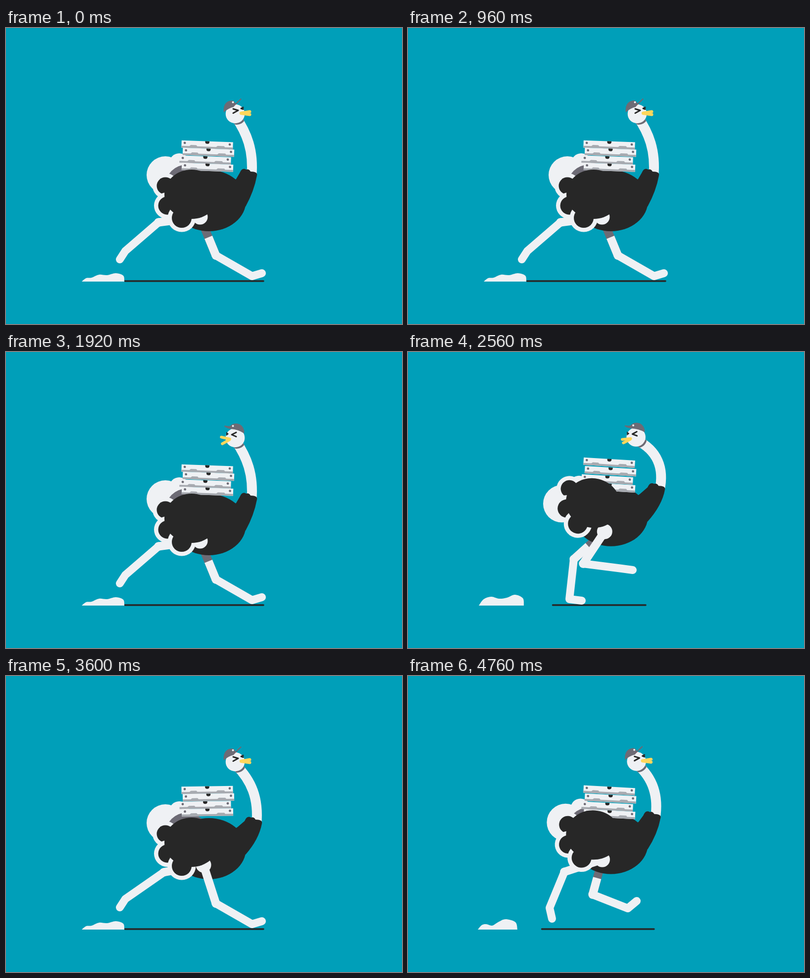
Recreate the animation shown at these times as an HTML page with a canvas. Size 800 by 600 pixels, loop 4800 ms.

```html
<!DOCTYPE html>
<html lang="en">
<head>
<meta charset="utf-8">
<title>Running ostrich</title>
<style>
html, body { margin: 0; width: 100%; height: 100%; overflow: hidden; background: #009fb9; }
canvas { display: block; width: 800px; height: 600px; }
</style>
</head>
<body>
<canvas id="stage" width="800" height="600"></canvas>
<script>
const ctx = document.getElementById('stage').getContext('2d');
const SKY = '#009fb9', WHITE = '#eff1f4', BLACK = '#272727', GRAY = '#6d6b75';
const SIDE = '#a7aab0', YELLOW = '#ffd75c';
const LOOP = 4800, TICK = 40, STRIDE = 480, STEP = 240;
const LOOK_BACK = 1000, LOOK_AHEAD = 2920;

// Knee, ankle and toe through one stride
const GAIT = [
  [308, 394, 241, 452, 230, 469],
  [308, 402, 255, 465, 243, 483],
  [318, 408, 302, 484, 300, 502],
  [337, 420, 393, 477, 406, 493],
  [354, 429, 432, 439, 454, 442],
  [373, 443, 444, 471, 462, 456],
  [424, 461, 497, 503, 517, 497],
  [390, 455, 455, 503, 478, 502],
  [362, 435, 412, 503, 436, 504],
  [345, 425, 369, 503, 394, 504],
  [335, 420, 326, 501, 351, 504],
  [316, 397, 286, 470, 291, 492]
];

// Dust outline as time within a step, then points
const DUST = [
  [0, [153, 514, 162, 507, 173, 506, 188, 500, 204, 501, 222, 497, 237, 502, 239, 514]],
  [160, [143, 514, 153, 501, 168, 496, 184, 500, 200, 498, 216, 492, 232, 499, 234, 514]],
  [200, [141, 514, 149, 505, 158, 503, 170, 506, 182, 499, 197, 493, 217, 499, 221, 514]]
];
DUST.push([STEP, DUST[0][1]]);

const mix = (a, b, k) => a + (b - a) * k;

function fillPath(color, d) {
  ctx.fillStyle = color;
  ctx.fill(new Path2D(d));
}

function ellipse(color, x, y, rx, ry = rx) {
  ctx.fillStyle = color;
  ctx.beginPath();
  ctx.ellipse(x, y, rx, ry, 0, 0, Math.PI * 2);
  ctx.fill();
}

function line(color, width, ...p) {
  ctx.strokeStyle = color;
  ctx.lineWidth = width;
  ctx.beginPath();
  for (let i = 0; i < p.length; i += 2) ctx.lineTo(p[i], p[i + 1]);
  ctx.stroke();
}

function placed(x, y, angle, draw) {
  ctx.save();
  ctx.translate(x, y);
  ctx.rotate(angle);
  draw();
  ctx.restore();
}

function dust(p) {
  const i = DUST.findIndex(([at]) => at > p);
  const [t0, a] = DUST[i - 1], [t1, b] = DUST[i];
  const pts = a.map((v, n) => mix(v, b[n], (p - t0) / (t1 - t0)));
  const last = pts.length / 2 - 1;
  const at = n => {
    const k = 2 * Math.max(0, Math.min(last, n));
    return [pts[k], pts[k + 1]];
  };
  ctx.fillStyle = WHITE;
  ctx.beginPath();
  ctx.moveTo(...at(0));
  for (let n = 0; n < last; n++) {
    const [x0, y0] = at(n - 1), [x1, y1] = at(n), [x2, y2] = at(n + 1), [x3, y3] = at(n + 2);
    ctx.bezierCurveTo(x1 + (x2 - x0) / 6, y1 + (y2 - y0) / 6,
      x2 - (x3 - x1) / 6, y2 - (y3 - y1) / 6, x2, y2);
  }
  ctx.fill();
}

function leg(pose, hipX, hipY, far) {
  const [kx, ky, ...foot] = GAIT[pose];
  const shift = far && pose === 0 ? 11 : 0;
  const x = kx + shift, y = ky + shift / 3;
  if (far) {
    line(GRAY, 17, hipX, hipY, x, y);
    ctx.lineCap = 'butt';
    line(WHITE, 17, mix(hipX, x, .53), mix(hipY, y, .53), x, y);
    ctx.lineCap = 'round';
  } else {
    ellipse(WHITE, hipX, hipY, 15.5);
    line(WHITE, 17, hipX, hipY, x, y);
  }
  line(WHITE, 16, x, y, ...foot);
  ellipse(WHITE, x, y, 8.7);
}

function pizzaBox() {
  ctx.fillStyle = WHITE;
  ctx.fillRect(-52, -7.5, 104, 15);
  fillPath(SIDE, 'M-52 3.5H-36L-33 1.2H-22L-20 3.5H18L21 1.2H34L36 3.5H52V7.5H-52Z');
  ellipse(GRAY, -45.5, -2.5, 2.4);
  ellipse(GRAY, 45.5, -2.5, 2.4);
  fillPath(BLACK, 'M-4.3 -7.5H4.3V-6A4.3 3.8 0 0 1 -4.3 -6Z');
}

function boxes(h, s, sway) {
  const angle = .01 + .026 * sway + .085 * s;
  [[406.5, 237, .45], [409, 252, .32], [402.5, 267.5, .25], [407, 282.5, .2]]
    .forEach(([x, y, lift]) =>
      placed(x, y - 3 * (1 - sway) - lift * h, angle, pizzaBox));
}

function wing(h, s) {
  placed(429, 325 - h, .31 * s, () => {
    ctx.translate(-429, -325);
    for (const [x, y, r] of [[322, 320, 17.5], [326, 360, 18.5], [355, 385, 20]]) {
      ellipse(WHITE, x, y, r + 8.5);
      ellipse(BLACK, x, y, r);
    }
    ellipse(BLACK, 375, 337, 55, 50);
  });
}

function neck(headX, headY, tipX, tipY, h) {
  const u = tipX - 490 + .3 * h;
  const path = new Path2D(`M${headX + 1} ${headY + 6}C${486 + u} ${212 - .7 * h} ` +
    `${501 + u} ${248 - .7 * h} ${tipX + 6} ${tipY + 10}`);
  ctx.lineWidth = 20;
  ctx.strokeStyle = WHITE;
  ctx.stroke(path);
  ctx.save();
  ctx.beginPath();
  ctx.arc(headX + 3, headY + 3, 19, 0, Math.PI * 2);
  ctx.clip();
  ctx.strokeStyle = GRAY;
  ctx.stroke(path);
  ctx.restore();
}

function sleeve(x, y, h) {
  fillPath(BLACK, `M440 ${325 - h}L${465 + (x - 490) * .3} ${306 - h}L${x - 18} ${y + 3}` +
    `Q${x - 13} ${y - 9} ${x - 5} ${y - 4}Q${x + 1} ${y - 6} ${x + 4} ${y}` +
    `Q${x + 19} ${y} ${x + 17} ${y + 8}Q${x + 11} ${y + 40} ${484} ${362 - h}Z`);
}

function headAhead() {
  fillPath(GRAY, 'M-23 -3C-25 -19 -17 -27 -6 -27Q-1 -26 1 -20L-3 -14Q-15 -11 -23 -3Z');
  line('#76646e', 2, -2, -17, 11.5, -30);
  ellipse(WHITE, -4.5, -23.5, 2);
  line(BLACK, 3, -4, -10, 6, -7, -4, -1.5);
  line(BLACK, 3, 16, -9.5, 12, -11, 16, -13);
  line(YELLOW, 6, 12, -1.5, 29.5, -4.5);
  line(YELLOW, 6, 12, -1, 29.5, 1.5);
}

function headBack(s) {
  fillPath(GRAY, 'M-21 -25Q-14 -23 -10 -24C-5 -31 10 -31 15 -22Q19 -16 18 -9' +
    'Q6 -17 -8 -18Q-14 -18 -22 -23Z');
  ellipse(WHITE, -4.5, -24, 2);
  line(BLACK, 3, 2, -11, -7, -6.5, 2, -2.5);
  fillPath(BLACK, 'M-18 -12L-13 -8L-18 -4Z');
  line(YELLOW, 5.5, -11, 2.5, -28, mix(-1.5, 5, s));
  line(YELLOW, 5.5, -12, 4, -26, mix(12, 10, s));
}

function draw(time) {
  const t = Math.floor((time % LOOP) / TICK) * TICK;
  const phase = t % STRIDE, p = t % STEP, pose = phase / TICK;
  const arch = Math.sin(Math.PI * p / STEP);
  const h = 21 * arch, s = arch * arch;
  const sway = Math.cos(2 * Math.PI * phase / STRIDE);
  const hipX = 395.5 - 3.5 * sway, hipY = 383 - 1.05 * h;
  const tipX = 495 - 5 * sway + .25 * h, tipY = 291 - 1.08 * h;
  const headX = 463 - .13 * h, headY = 174 - .08 * h;

  ctx.fillStyle = SKY;
  ctx.fillRect(0, 0, 800, 600);
  ctx.lineCap = ctx.lineJoin = 'round';

  line(BLACK, 3.5, 240.5 + 2.86 * h, 513, 520 - 2.2 * h, 513);
  dust(p);

  ellipse(WHITE, 322 - 14.7 * s, 298 - h + 37 * s, 38);
  ellipse(WHITE, 350 - 6 * s, 274 - h + 20 * s, 20);
  ellipse(GRAY, 365, 320 - h, 43);
  leg((pose + 6) % 12, hipX, hipY, true);
  neck(headX, headY, tipX, tipY, h);
  ellipse(BLACK, 410, 350 - h, 75, 62);
  sleeve(tipX, tipY, h);
  boxes(h, s, sway);
  leg(pose, hipX, hipY, false);
  wing(h, s);

  const lookingBack = t >= LOOK_BACK && t < LOOK_AHEAD;
  placed(headX, headY, lookingBack ? -.06 * s : 0, () => {
    ellipse(WHITE, 0, 0, 19.3);
    if (lookingBack) headBack(s);
    else headAhead();
  });
}

const start = performance.now();
function tick() {
  draw(performance.now() - start);
  requestAnimationFrame(tick);
}
tick();
</script>
</body>
</html>
```
